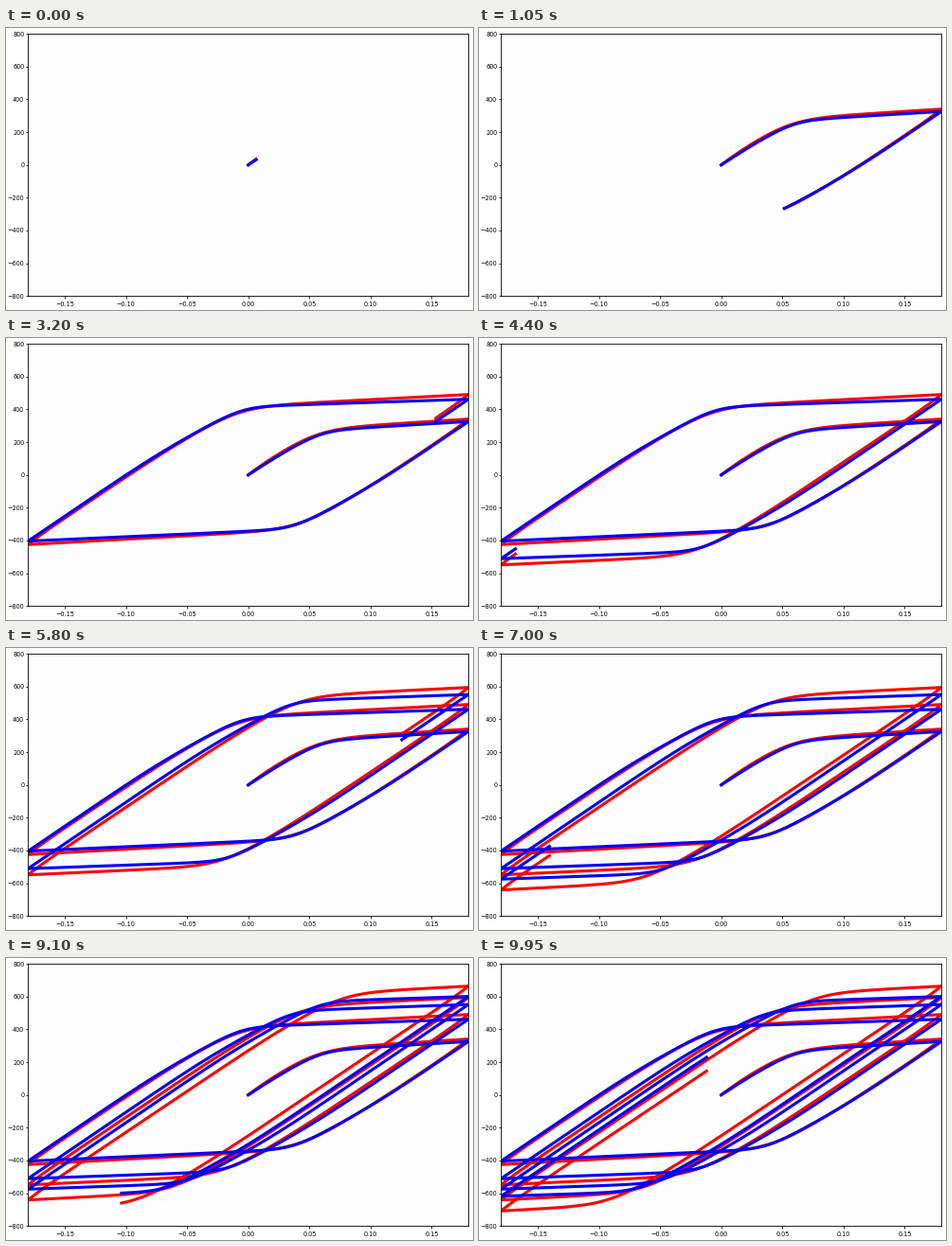
Write a matplotlib script that moves like this. It is 493 by 298 pixels and loops after 10000 ms.

```python
import numpy as np
import matplotlib.pyplot as plt
from matplotlib.animation import FuncAnimation

W, H, DPI = 493, 298, 64
PX = 72 / DPI                      # one pixel in points
FRAMES, INTERVAL = 200, 50
AMP = 0.18                         # strain amplitude
START, SPEED = 0.0064, 0.01438     # strain travelled at the start and per frame
STEP = 0.0015

plt.rcParams["font.family"] = "DejaVu Sans"


def softplus(s, width):
    return width * np.logaddexp(0, s / width)


def knee(s, at, lead, share, width):
    """Early gentle bend followed by the main one; both add up to a bend at `at`."""
    early = softplus(s - at + lead, 0.0155)
    main = softplus(s - at - share * lead / (1 - share), width)
    return share * early + (1 - share) * main


def leg(s, length, rise, hard, lead, stiff, jump, share, width):
    """Stress gained after strain s on a branch that gains `rise` over `length`."""
    at = (rise - jump - hard * length) / (stiff - hard)

    def raw(t):
        return (stiff * t - (stiff - hard) * knee(t, at, lead, share, width)
                + jump * (1 - np.exp(-t / 0.012)))

    base = raw(0.0)
    scale = rise / (raw(length) - base)
    return (raw(s) - base) * scale


def strain(d):
    """Triangle wave: 0, up to AMP, then back and forth."""
    phase = (d + AMP) % (4 * AMP)
    return AMP - np.abs(phase - 2 * AMP)


def stress(d, peaks, hards, first_lead, **shape):
    out = np.zeros_like(d)
    begin, level = 0.0, 0.0
    for i, (peak, hard) in enumerate(zip(peaks, hards)):
        length = AMP if i == 0 else 2 * AMP
        sign = 1 if i % 2 == 0 else -1
        lead = first_lead if i == 0 else 0.054
        on = (d >= begin) & (d <= begin + length)
        out[on] = level + sign * leg(d[on] - begin, length, abs(peak - level),
                                     hard, lead, **shape)
        begin += length
        level = peak
    return out


RED = dict(peaks=[341, -425, 491, -549, 595, -641, 664, -708, 705],
           hards=[470, 410, 390, 345, 370] + [385] * 4, first_lead=0.0155,
           stiff=5015, jump=11.5, share=0.12, width=0.0135)
BLUE = dict(peaks=[326, -404, 462, -511, 552, -575, 601, -618, 624],
            hards=[450, 335, 245, 265, 260, 260] + [240] * 3, first_lead=0.027,
            stiff=5070, jump=0, share=0.21, width=0.009)

grid = np.arange(0, 2000) * STEP

fig = plt.figure(figsize=(W / DPI, H / DPI), dpi=DPI, facecolor="white")
left, right, top, bottom = 23.2, 488.2, 6.2, 283.2
ax = fig.add_axes([left / W, 1 - bottom / H, (right - left) / W, (bottom - top) / H],
                  facecolor="#fefdfe")
ax.set_xlim(-AMP, AMP)
ax.set_ylim(-800, 800)
ax.set_xticks(np.arange(-3, 4) * 0.05)
ax.set_yticks(np.arange(-800, 801, 200))
ax.tick_params(labelsize=6.5 * PX, length=2.5 * PX, width=0.8 * PX)
ax.tick_params(axis="x", pad=2.8 * PX)
ax.tick_params(axis="y", pad=1.5 * PX)
for spine in ax.spines.values():
    spine.set_linewidth(0.85 * PX)

curves = [(ax.plot([], [], color=color, lw=3.1 * PX)[0], model)
          for color, model in (("red", RED), ("blue", BLUE))]


def draw(n):
    tip = START + SPEED * n
    d = np.append(grid[grid < tip], tip)
    x = strain(d)
    for line, model in curves:
        line.set_data(x, stress(d, **model))
    return [line for line, _ in curves]


anim = FuncAnimation(fig, draw, frames=FRAMES, interval=INTERVAL,
                     repeat=True, repeat_delay=0, init_func=lambda: draw(0))
plt.show()
```
